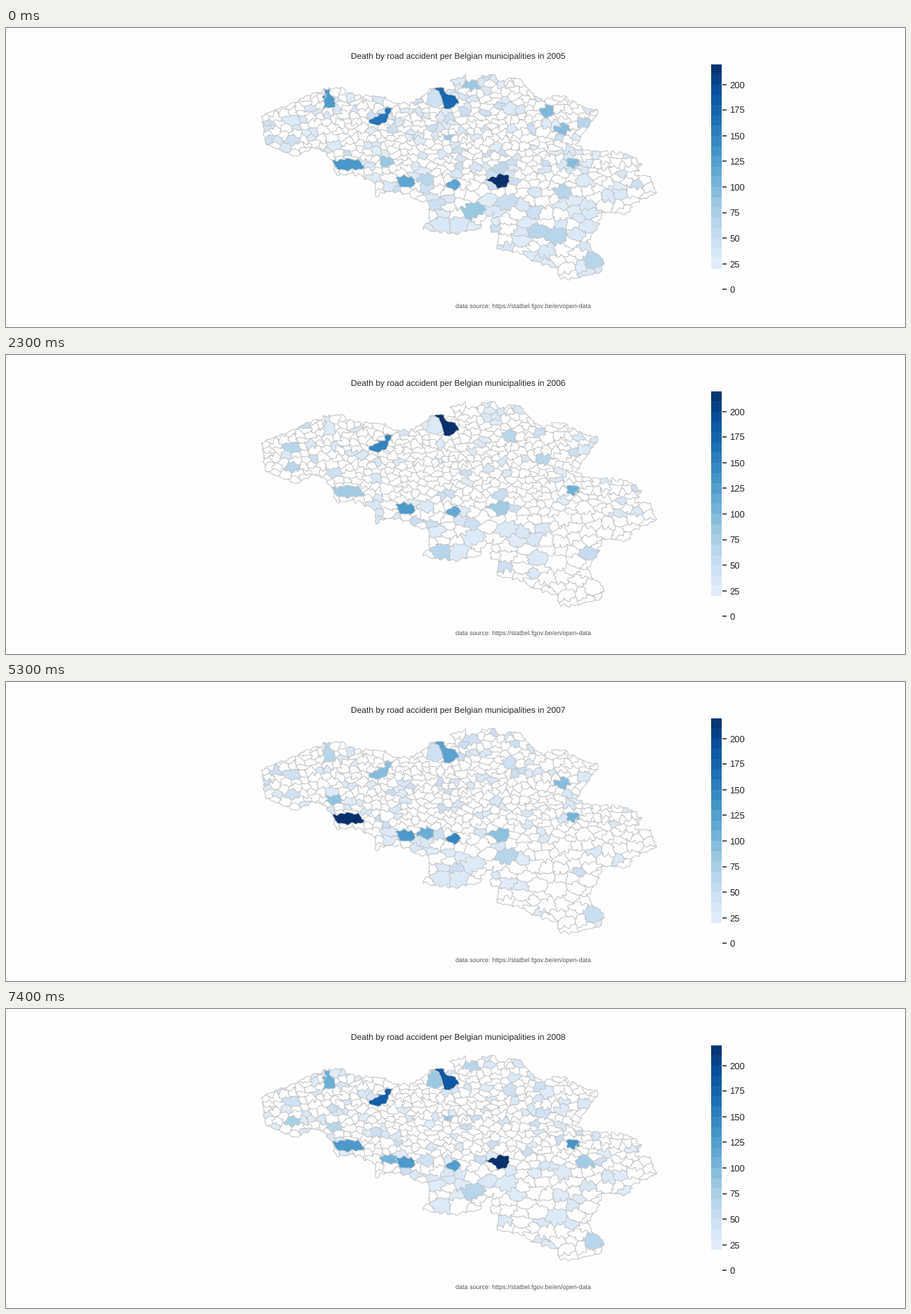
Animation, 1280 px wide and 427 px high, one loop 8000 ms. Source, as a matplotlib script:

```python
import numpy as np
import matplotlib.pyplot as plt
from matplotlib.animation import FuncAnimation
from matplotlib.collections import PolyCollection
from matplotlib.path import Path

W, H, DPI = 1280, 427, 64
PT = 72 / DPI                      # points per pixel
PAPER, INK, GRID = "#fefefe", "#262626", "#c6c7c8"
FIRST_YEAR = 2005
STARTS = [0, 500, 3500, 6500]
STEP, LOOP = 500, 8000
LOWEST, HIGHEST = 20, 220          # visible range of the colour scale
SHARES = [0.30, 0.13, 0.15, 0.26]  # lightly tinted municipalities per year
STRETCH = np.array([1, 1.5])       # degrees of longitude are shorter than latitude
rng = np.random.default_rng(11)
plt.rcParams.update({"font.family": "Liberation Sans", "text.hinting": "none",
                     "text.hinting_factor": 1})

BORDER = [
    (362, 126), (418, 103), (455, 87), (482, 86), (484, 93), (512, 97), (541, 99),
    (548, 106), (575, 109), (598, 95), (607, 85), (623, 85), (625, 91), (642, 87),
    (631, 74), (654, 69), (655, 76), (672, 76), (676, 69), (697, 68), (704, 77),
    (724, 70), (735, 76), (748, 93), (764, 103), (790, 96), (821, 113), (844, 118),
    (834, 134), (818, 156), (812, 167), (829, 176), (855, 177), (885, 179),
    (905, 194), (895, 209), (919, 213), (925, 237), (891, 251), (886, 266),
    (850, 262), (843, 283), (828, 305), (837, 321), (852, 331), (847, 349),
    (805, 358), (789, 357), (786, 344), (747, 332), (737, 322), (700, 316),
    (700, 293), (690, 290), (694, 264), (677, 275), (675, 286), (638, 294),
    (594, 287), (604, 271), (602, 248), (584, 247), (575, 237), (538, 233),
    (527, 239), (525, 220), (500, 209), (470, 209), (465, 190), (455, 177),
    (437, 171), (413, 183), (371, 166)]

# x, y, then deaths in each of the four years
TOWNS = [
    (409, 160, 45, 65, 45, 75), (407, 132, 30, 65, 45, 45), (467, 168, 30, 45, 90, 65),
    (664, 83, 85, 0, 45, 65), (717, 115, 30, 65, 45, 45), (770, 119, 100, 0, 0, 30),
    (793, 144, 95, 0, 95, 30), (765, 149, 0, 65, 0, 45), (824, 134, 65, 30, 30, 30),
    (630, 156, 85, 0, 45, 85), (543, 191, 85, 0, 0, 0), (545, 214, 0, 0, 30, 105),
    (597, 216, 65, 30, 110, 45), (704, 200, 60, 50, 0, 0), (663, 261, 85, 30, 30, 65),
    (621, 280, 35, 65, 30, 30), (645, 280, 35, 30, 30, 0), (832, 284, 30, 55, 0, 0),
    (757, 290, 65, 30, 0, 0), (783, 297, 65, 0, 0, 30), (836, 332, 65, 0, 50, 65),
    (793, 233, 65, 0, 0, 30), (713, 248, 50, 30, 65, 30), (823, 218, 30, 0, 0, 80)]

cities = []


def city(deaths, *outline):
    cities.append((deaths, np.array(outline, float)))


city((45, 30, 45, 85), (598, 109), (602, 95), (607, 87), (615, 90), (622, 103),
     (621, 110), (612, 114))
city((172, 220, 122, 185), (607, 85), (623, 85), (625, 93), (640, 97), (645, 106),
     (631, 117), (623, 114), (622, 103), (615, 90))
city((162, 148, 95, 182), (516, 133), (524, 127), (539, 121), (541, 114), (550, 113),
     (545, 124), (545, 130), (533, 139), (523, 138))
city((130, 30, 65, 110), (453, 88), (460, 87), (462, 95), (467, 99), (469, 113),
     (450, 115), (455, 110), (452, 104), (456, 98))
city((132, 80, 220, 130), (465, 190), (488, 186), (503, 189), (511, 198), (504, 203),
     (496, 201), (488, 204), (470, 201))
city((118, 130, 130, 130), (555, 214), (562, 211), (578, 212), (583, 223), (577, 228),
     (560, 226))
city((118, 114, 148, 128), (627, 223), (638, 215), (648, 222), (641, 232), (630, 228))
city((220, 80, 92, 220), (681, 217), (690, 213), (698, 213), (703, 208), (716, 211),
     (717, 222), (709, 228), (699, 228), (691, 220))
city((95, 108, 105, 135), (798, 187), (811, 186), (817, 190), (808, 200), (799, 197))

WAVES = rng.normal(0, 1, (9, 2))
WAVES *= (rng.uniform(0.35, 1.1, 9) / np.hypot(*WAVES.T))[:, None]
PHASES = rng.uniform(0, 2 * np.pi, (2, 9))


def roughen(points, amount):
    """Subdivide a closed outline and shift it by position-based ripples."""
    points = np.asarray(points, float)
    pieces = []
    for a, b in zip(points, np.roll(points, -1, axis=0)):
        n = max(2, int(np.hypot(*(b - a)) / 1.6))
        pieces.append(a + (b - a) * np.arange(n)[:, None] / n)
    line = np.vstack(pieces)
    angle = line @ WAVES.T
    shift = [np.sin(angle + phase).sum(axis=1) for phase in PHASES]
    return line + amount * np.column_stack(shift)


def halfplane(poly, normal, limit):
    """Keep the part of a polygon where p . normal <= limit."""
    kept = []
    for p, q in zip(poly, poly[1:] + poly[:1]):
        dp = p[0] * normal[0] + p[1] * normal[1] - limit
        dq = q[0] * normal[0] + q[1] * normal[1] - limit
        if dp <= 0:
            kept.append(p)
        if dp * dq < 0:
            t = dp / (dp - dq)
            kept.append((p[0] + t * (q[0] - p[0]), p[1] + t * (q[1] - p[1])))
    return kept


def power_cell(i):
    """Weighted Voronoi cell of one site, in pixels."""
    offsets = sites - sites[i]
    dist = (offsets ** 2).sum(axis=1)
    cell = [(-45, -45), (45, -45), (45, 45), (-45, 45)]
    for j in np.argsort(dist)[1:30]:
        cell = halfplane(cell, offsets[j], (dist[j] + weights[i] - weights[j]) / 2)
    return (np.array(cell) + sites[i]) / STRETCH


def spacing(x, y):
    """Small municipalities in the north and the capital, large ones in the south."""
    capital = np.exp(-((x - 628) ** 2 + (1.5 * (y - 158)) ** 2) / 300)
    return 10.4 + 5.5 * np.clip((y - 200) / 50, 0, 1) - 5 * capital


sites, weights, reach, deaths = [], [], [], []


def add_site(x, y, counts, weight, room):
    sites.append(np.array([x, y]) * STRETCH)
    weights.append(weight * spacing(x, y) ** 2)
    reach.append(room)
    deaths.append(counts)


for counts, outline in cities:
    add_site(*outline.mean(axis=0), counts, 0, 1)
for x, y, *counts in TOWNS:
    add_site(x, y, counts, 0.6, 1.35)

city_paths = [Path(outline) for _, outline in cities]
darts = rng.uniform((360, 64), (927, 360), (20000, 2))
for x, y in darts[Path(BORDER).contains_points(darts)]:
    gaps = np.sqrt(((np.array(sites) - (x, y) * STRETCH) ** 2).sum(axis=1))
    crowded = (gaps < spacing(x, y) * np.array(reach)).any()
    if crowded or any(path.contains_point((x, y)) for path in city_paths):
        continue
    tinted = rng.random(4) < np.array(SHARES) * spacing(x, y) / 12
    counts = tinted * rng.choice([26, 32, 48], 4, p=[0.35, 0.45, 0.2])
    add_site(x, y, counts, rng.uniform(0, 0.3), 1)
sites = np.array(sites)
deaths += [counts for counts, _ in cities]

shapes = [roughen(power_cell(i), 0.65) for i in range(len(sites))]
shapes += [roughen(outline, 0.3) for _, outline in cities]
coast = roughen(BORDER, 0.5)


def shade(v):
    return plt.cm.Blues(v / HIGHEST) if v >= LOWEST else (0.996, 0.996, 0.996, 1)


fills = [[shade(counts[k]) for counts in deaths] for k in range(len(STARTS))]

fig = plt.figure(figsize=(W / DPI, H / DPI), dpi=DPI, facecolor=PAPER)
ax = fig.add_axes([0, 0, 1, 1])
ax.set(xlim=(0, W), ylim=(H, 0))
ax.axis("off")

cells = PolyCollection(shapes, edgecolors=GRID, linewidths=PT, facecolors=fills[0])
ax.add_collection(cells, autolim=False)
cells.set_clip_path(Path(coast), transform=ax.transData)
ax.fill(*coast.T, facecolor="none", edgecolor=GRID, linewidth=1.1 * PT)


def label(x, y, text, size, color=INK, ha="left"):
    return ax.text(x, y, text, fontsize=size * PT, color=color, ha=ha, va="baseline")


def scale_y(v):
    return 373.3 - 1.4625 * v


for v in range(LOWEST, HIGHEST, 10):
    ax.fill_between([1004, 1019], round(scale_y(v)), round(scale_y(v + 10)),
                    color=plt.cm.Blues((v + 5) / HIGHEST), lw=0)
for v in range(0, 201, 25):
    y = scale_y(v)
    ax.plot([1020.3, 1026.3], [y, y], color=INK, lw=1.5 * PT, solid_capstyle="butt")
    label(1030.3, y + 4.8, str(v), 13.04)

title = label(643.5, 45, "", 11.85, ha="center")
label(640, 400, "data source: https://statbel.fgov.be/en/open-data", 9.48, "#555555")


def update(i):
    k = sum(i * STEP >= start for start in STARTS) - 1
    cells.set_facecolor(fills[k])
    title.set_text("Death by road accident per Belgian municipalities in "
                   f"{FIRST_YEAR + k}")
    return cells, title


anim = FuncAnimation(fig, update, frames=LOOP // STEP, interval=STEP, repeat=True,
                     repeat_delay=0, blit=False)
plt.show()
```
